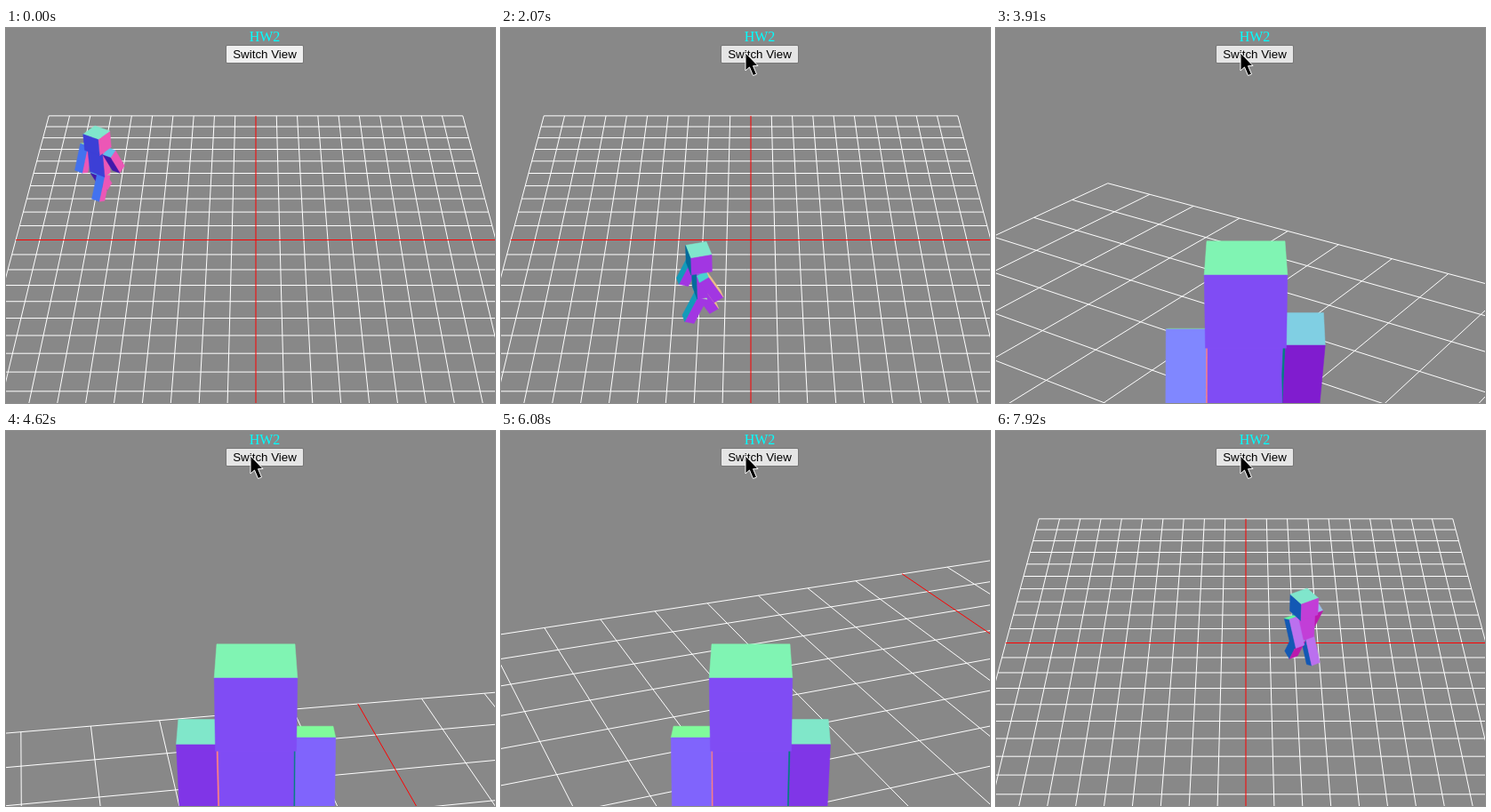
An HTML page with a canvas that plays this animation: 550 px wide and 422 px high, repeating every 8000 ms.

```html
<!DOCTYPE html>
<html lang="en">
<head>
<meta charset="utf-8">
<title>HW2</title>
<style>
  html, body { margin: 0; width: 100%; height: 100%; overflow: hidden; background: #888; }
  canvas { display: block; }
</style>
</head>
<body>
<canvas width="550" height="422"></canvas>
<script>
const ctx = document.querySelector('canvas').getContext('2d');
const LOOP = 8, FOCAL = 1350, CENTER_X = 281, CENTER_Y = 238.5;
const CHASE_START = 3.84, CHASE_END = 6.89, PRESS = 0.08;

// Walk path: time (s), position x z, velocity x z
const PATH = [
  [0, -67.3, -33, -32, 51],
  [0.92, -75.5, 20.6, 21, 54],
  [1.69, -43, 50, 58, 12],
  [2.53, 6, 34, 42, -45],
  [3.23, 20, -1.4, 2, -42],
  [4.62, 50, -24.7, 29.5, 5.3],
  [6.08, 68, 10, -10.5, 26],
  [6.92, 48.8, 24.7, -29.5, 5],
  [7.92, 23, 12.1, -20, -33],
  [8, 21.3, 9.4, -20, -33]
];

// Boxes in body space: centre (right, up, forward), size, swing direction
const BODY = [
  { at: [0, 28, 0], size: [8, 8, 8], swing: 0 },
  { at: [0, 18, 0], size: [8, 12, 4], swing: 0 },
  { at: [6, 18, 0], size: [4, 12, 4], swing: 1 },
  { at: [-6, 18, 0], size: [4, 12, 4], swing: -1 },
  { at: [2, 6, 0], size: [4, 12, 4], swing: -1 },
  { at: [-2, 6, 0], size: [4, 12, 4], swing: 1 }
];

const dot = (a, b) => a[0] * b[0] + a[1] * b[1] + a[2] * b[2];
const sub = (a, b) => a.map((v, i) => v - b[i]);
const mix = (a, b, k) => a.map((v, i) => v + (b[i] - v) * k);

function walkerAt(t) {
  let i = 0;
  while (i < PATH.length - 2 && t >= PATH[i + 1][0]) i++;
  const a = PATH[i], b = PATH[i + 1], span = b[0] - a[0], s = (t - a[0]) / span;
  const hermite = k => {
    const p = a[k], q = b[k], u = a[k + 2] * span, v = b[k + 2] * span;
    const c2 = 3 * (q - p) - 2 * u - v, c3 = 2 * (p - q) + u + v;
    return [p + s * (u + s * (c2 + s * c3)), (u + s * (2 * c2 + 3 * s * c3)) / span];
  };
  const [x, vx] = hermite(1), [z, vz] = hermite(2), speed = Math.hypot(vx, vz);
  const heading = [vx / speed, 0, vz / speed];
  return { pos: [x, 0, z], heading, right: [-heading[2], 0, heading[0]] };
}

function makeCamera(pos, [hx, , hz], pitch) {
  const c = Math.cos(pitch), s = Math.sin(pitch);
  return { pos, right: [-hz, 0, hx], up: [hx * s, c, hz * s], forward: [hx * c, -s, hz * c] };
}

function toView(cam, point) {
  const d = sub(point, cam.pos);
  return [dot(d, cam.right), dot(d, cam.up), dot(d, cam.forward)];
}

const toScreen = ([x, y, depth]) => [CENTER_X + FOCAL * x / depth, CENTER_Y - FOCAL * y / depth];

function drawLine(cam, from, to, color) {
  let a = toView(cam, from), b = toView(cam, to);
  const near = 1;
  if (a[2] < near && b[2] < near) return;
  if (a[2] < near) a = mix(a, b, (near - a[2]) / (b[2] - a[2]));
  if (b[2] < near) b = mix(b, a, (near - b[2]) / (a[2] - b[2]));
  ctx.strokeStyle = color;
  ctx.beginPath();
  ctx.moveTo(...toScreen(a));
  ctx.lineTo(...toScreen(b));
  ctx.stroke();
}

function drawGrid(cam) {
  ctx.lineWidth = 1;
  const cross = (i, color) => {
    drawLine(cam, [i, 0, -100], [i, 0, 100], color);
    drawLine(cam, [-100, 0, i], [100, 0, i], color);
  };
  for (let i = -100; i <= 100; i += 10) if (i) cross(i, '#fff');
  cross(0, '#f00');
}

function drawBox(cam, walker, { at, size, swing }, angle) {
  const c = Math.cos(swing * angle), s = Math.sin(swing * angle);
  const turn = ([r, y, f]) => [r, y * c + f * s, f * c - y * s];
  const toWorld = ([r, y, f]) => walker.right.map((v, i) =>
    v * r + walker.heading[i] * f + (i === 1 ? y : 0));
  const pivot = at[1] + size[1] / 2;
  const place = local => {
    const p = turn([at[0] + local[0], local[1] - size[1] / 2, at[2] + local[2]]);
    p[1] += pivot;
    return toWorld(p).map((v, i) => v + walker.pos[i]);
  };
  for (let axis = 0; axis < 3; axis++) for (const side of [-1, 1]) {
    const corner = (u, v) => {
      const p = [0, 0, 0];
      p[axis] = side * size[axis] / 2;
      p[(axis + 1) % 3] = u * size[(axis + 1) % 3] / 2;
      p[(axis + 2) % 3] = v * size[(axis + 2) % 3] / 2;
      return place(p);
    };
    const unit = [0, 0, 0];
    unit[axis] = side;
    const normal = toWorld(turn(unit));
    if (dot(normal, sub(corner(0, 0), cam.pos)) >= 0) continue;
    // Colour is the normal in view space
    const rgb = [dot(normal, cam.right), dot(normal, cam.up), -dot(normal, cam.forward)]
      .map(v => Math.round(127.5 + 127.5 * v));
    ctx.fillStyle = ctx.strokeStyle = `rgb(${rgb})`;
    ctx.lineWidth = 0.5;
    ctx.beginPath();
    for (const [u, v] of [[-1, -1], [1, -1], [1, 1], [-1, 1]])
      ctx.lineTo(...toScreen(toView(cam, corner(u, v))));
    ctx.closePath();
    ctx.fill();
    ctx.stroke();
  }
}

function drawWalker(cam, walker, t) {
  const angle = 0.5 * Math.sin(1.15 + 6.46 * t);
  const depth = ({ at }) => toView(cam, walker.pos.map((v, i) =>
    v + walker.right[i] * at[0] + (i === 1 ? at[1] : 0)))[2];
  [...BODY].sort((a, b) => depth(b) - depth(a))
    .forEach(box => drawBox(cam, walker, box, angle));
}

function drawHeader(hover, pressed) {
  ctx.textAlign = 'center';
  ctx.fillStyle = '#0ff';
  ctx.font = '16px "Liberation Serif", serif';
  ctx.fillText('HW2', 291, 15);
  ctx.fillStyle = '#767676';
  ctx.beginPath();
  ctx.roundRect(247, 19, 88, 21, 2);
  ctx.fill();
  ctx.fillStyle = pressed ? '#f5f5f5' : hover ? '#e5e5e5' : '#efefef';
  ctx.beginPath();
  ctx.roundRect(248, 20, 86, 19, 1);
  ctx.fill();
  ctx.fillStyle = '#000';
  ctx.font = '13.333px "Liberation Sans", sans-serif';
  ctx.fillText('Switch View', 291, 34);
}

function cursorAt(t) {
  const s = Math.min(1, (t - 0.07) / 0.77), k = (1 - s) ** 2;
  return [275 + 179 * k, 28 + 308 * k];
}

function drawCursor(x, y) {
  ctx.beginPath();
  for (const [dx, dy] of [[0, 0], [0, 20], [4.5, 16], [8.5, 25.5], [12.5, 24], [8.5, 14.7], [14, 14.5]])
    ctx.lineTo(x + dx, y + dy);
  ctx.closePath();
  ctx.fillStyle = '#000';
  ctx.strokeStyle = '#fff';
  ctx.lineWidth = 1;
  ctx.fill();
  ctx.stroke();
}

function draw(now) {
  const t = now / 1000 % LOOP;
  const walker = walkerAt(t);
  const chasing = t >= CHASE_START && t < CHASE_END;
  const chasePos = walker.pos.map((v, i) => i === 1 ? 82 : v - 108 * walker.heading[i]);
  const cam = chasing
    ? makeCamera(chasePos, walker.heading, 24 * Math.PI / 180)
    : makeCamera([0, 300, 400], [0, 0, -1], Math.atan2(3, 4));
  ctx.fillStyle = '#888';
  ctx.fillRect(0, 0, 550, 422);
  drawGrid(cam);
  drawWalker(cam, walker, t);

  const [x, y] = cursorAt(t), visible = t >= 0.07;
  const hover = visible && x > 247 && x < 335 && y < 40;
  const pressed = [CHASE_START, CHASE_END].some(end => t >= end - PRESS && t < end);
  drawHeader(hover, pressed);
  if (visible) drawCursor(x, y);
  requestAnimationFrame(draw);
}
requestAnimationFrame(draw);
</script>
</body>
</html>
```
